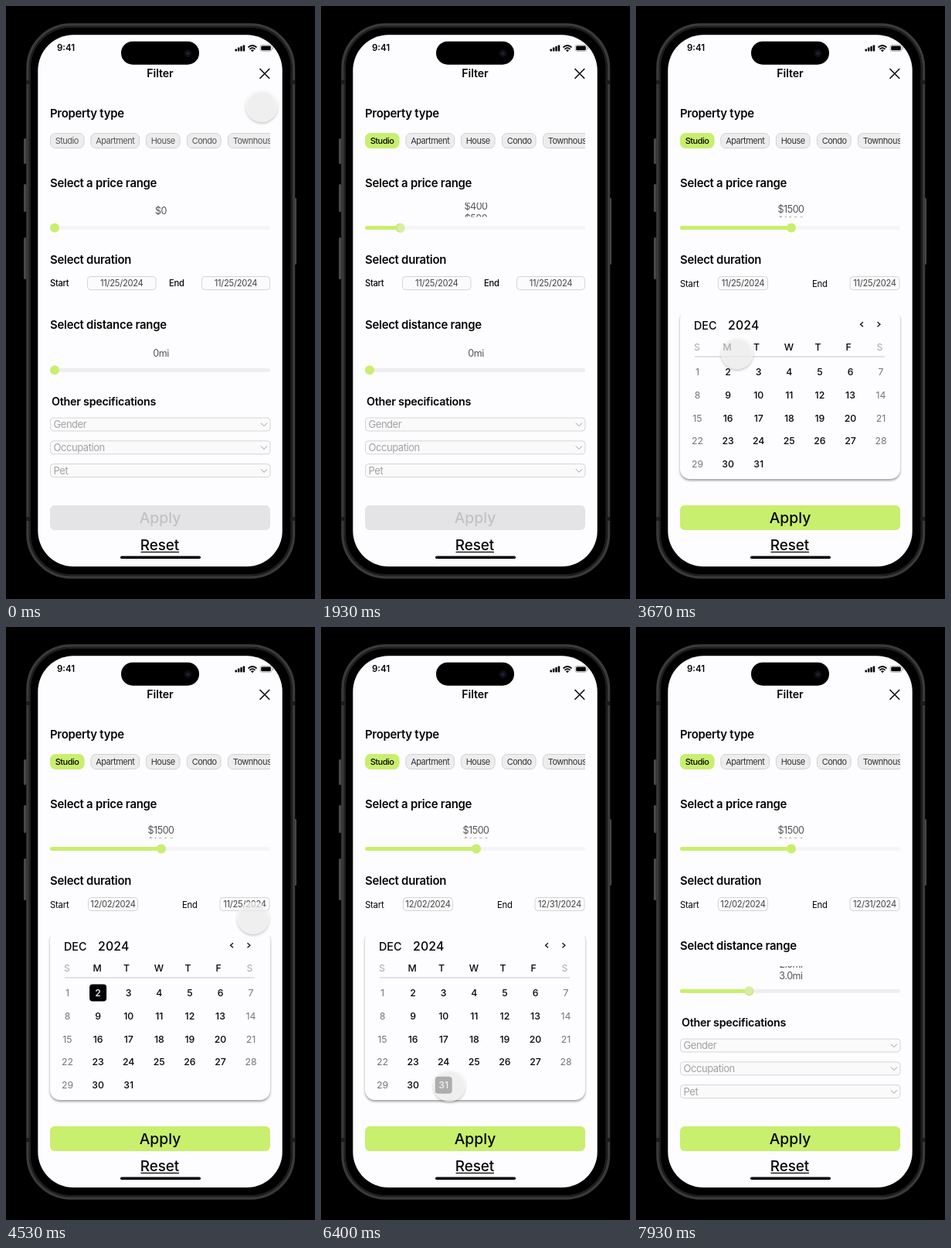
An HTML page that plays this animation: 400 by 766 pixels, repeating every 8 s.

```html
<!DOCTYPE html>
<html lang="en">
<head>
<meta charset="utf-8">
<title>Filter screen</title>
<style>
html, body { margin: 0; width: 100%; height: 100%; overflow: hidden; background: #000; }
svg { display: block; width: 100vw; height: 100vh; font-family: Inter, "Open Sans", sans-serif; }
text { white-space: pre; }
#touch { filter: drop-shadow(0 2.5px 1.6px rgba(0,0,0,.27)); }
</style>
</head>
<body>
<svg id="stage" viewBox="0 0 400 766"></svg>
<script>
const LOOP = 8000;
const GREEN = '#c8ef6e';
const INK = '#050505';
const stage = document.getElementById('stage');

// Markup helpers
const rect = (x, y, w, h, r, fill, more = '') =>
  `<rect x="${x}" y="${y}" width="${w}" height="${h}" rx="${r}" fill="${fill}" ${more}/>`;
const path = (d, color, width, more = '') =>
  `<path d="${d}" fill="none" stroke="${color}" stroke-width="${width}" ${more}/>`;
const circle = (x, y, r, fill, more = '') =>
  `<circle cx="${x}" cy="${y}" r="${r}" fill="${fill}" ${more}/>`;
const label = (s, x, y, size, { weight = 400, fill = INK, anchor = 'start', gap = 0, id = '' } = {}) =>
  `<text x="${x}" y="${y}" font-size="${size}" font-weight="${weight}" fill="${fill}"
    text-anchor="${anchor}" letter-spacing="${gap}" ${id && `id="${id}"`}>${s}</text>`;
const group = (id, body, more = '') => `<g id="${id}" ${more}>${body}</g>`;
const heading = (s, y, x = 57, size = 14.9) => label(s, x, y, size, { weight: 600, gap: -.25 });

function phone() {
  const buttons = [[23, 171, 33], [23, 230, 36], [23, 299, 54], [372.5, 248, 86]]
    .map(([x, y, h]) => rect(x, y, 3.5, h, 1.5, '#48484a')).join('');
  const bands = [[26, 96], [26, 660], [368, 96], [368, 660]]
    .map(([x, y]) => rect(x, y, 6, 5, 0, '#1b1b1c')).join('');
  return buttons +
    rect(28, 24, 344.5, 714, 56, '#000', 'stroke="#3a3a3c" stroke-width="3.5"') +
    rect(31, 27, 338.5, 708, 53, '#000', 'stroke="#202021" stroke-width="2"') + bands +
    rect(41.3, 37.3, 316.4, 686.7, 46, '#fdfcfe') +
    rect(149, 45.7, 101, 30, 15, '#000') +
    circle(235.5, 61.3, 5, '#0d0e13') + circle(235.5, 61.3, 2.3, '#1c2030');
}

function header() {
  const bars = [3, 5, 6.5, 8].map((h, i) => rect(296.5 + i * 3.4, 58.5 - h, 2.5, h, .7, INK)).join('');
  const wifi = path('M313.5 53.5Q319 48.5 324.5 53.5M315.5 55.8Q319 52.6 322.5 55.8', INK, 1.7) +
    `<path d="M317 57.2Q319 55.4 321 57.2L319 59.2Z" fill="${INK}"/>`;
  const battery = rect(329, 50.3, 15, 8.2, 2.4, 'none', 'stroke="#aaa" stroke-width=".8"') +
    rect(330.2, 51.5, 12.6, 5.8, 1.4, INK) + rect(344.9, 53, 1, 3, .5, '#aaa');
  return label('9:41', 66, 58, 11.5, { weight: 600 }) + bars + wifi + battery +
    label('Filter', 199.5, 92, 14.2, { weight: 600, anchor: 'middle', gap: -.1 }) +
    path('M328.5 81L341.2 93.7M341.2 81L328.5 93.7', INK, 1.5);
}

function chips() {
  const items = [['Studio', 57, 44.5], ['Apartment', 109.5, 63.5], ['House', 181, 44.5], ['Condo', 234, 44.5], ['Townhouse', 287, 70]];
  const body = items.map(([name, x, w], i) =>
    rect(x + .4, 164.5, w - .8, 19, 6.5, '#ededee', `stroke="#cfcfd1" stroke-width=".9" ${i ? '' : 'id="studio"'}`) +
    label(name, x + 6.7, 178, 11, { gap: -.5 })).join('');
  return heading('Property type', 144) + group('chips', body, 'clip-path="url(#chipClip)"');
}

function slider(id, y, track) {
  return rect(57, y - 2.5, 285, 5, 2.5, track) +
    rect(57, y - 2.5, 6, 5, 2.5, GREEN, `id="${id}Fill"`) +
    circle(63, y, 6, GREEN, `id="${id}Knob"`);
}

const reel = (id, values, y, step) => group(id + 'Clip',
  group(id + 'Reel', values.map((v, i) =>
    label(v, 200.5, y + i * step, 12.5, { fill: '#555', anchor: 'middle', gap: -.45 })).join('')),
  `clip-path="url(#${id}Window)"`);

const dateBox = (s, x, w, id) =>
  rect(x, 349.5, w, 17, 4, '#fbfafc', 'stroke="#d4d4d6" stroke-width="1"') +
  label(s, x + w / 2, 362, 11.2, { fill: '#444', anchor: 'middle', gap: -.28, id });

function dates() {
  const day = '11/25/2024';
  const bold = { weight: 500, gap: -.3 };
  return heading('Select duration', 333) +
    group('wideDates', label('Start', 57, 361.5, 11.2, bold) + dateBox(day, 105.5, 88.5) +
      label('End', 211, 361.5, 11.2, bold) + dateBox(day, 253.5, 88)) +
    group('slimDates', label('Start', 57, 362.5, 11.3, { gap: -.2 }) + dateBox(day, 106.5, 64, 'startDate') +
      label('End', 228, 362.5, 11.3, { gap: -.2 }) + dateBox(day, 277, 64, 'endDate'));
}

function lower() {
  const selects = ['Gender', 'Occupation', 'Pet'].map((name, i) => {
    const y = 532 + i * 29.8;
    return rect(57.5, y, 284.5, 17, 4, '#fafafb', 'stroke="#d6d6d8" stroke-width="1"') +
      label(name, 61.5, y + 13, 13, { fill: '#a2a2a4', gap: -.45 }) +
      path(`M330 ${y + 6.7}l4 4l4 -4`, '#9a9a9c', 1);
  }).join('');
  const miles = Array.from({ length: 8 }, (_, i) => (i ? (i / 2).toFixed(1) : '0') + 'mi');
  return heading('Select distance range', 417) + reel('mile', miles, 452.5, 15) +
    slider('mile', 470.3, '#eeedef') + heading('Other specifications', 516, 59, 14.3) + selects;
}

const columnX = c => 79.5 + c * 39.6;
const rowY = r => 472.5 + r * 29.8;

function calendar() {
  const mid = (s, x, y, weekend, light, size = 12.3) => label(s, x, y, size,
    { weight: weekend ? 400 : 500, fill: weekend ? light : INK, anchor: 'middle' });
  const names = [79, 118, 156, 198, 235.5, 275, 315.5]
    .map((x, i) => mid('SMTWTFS'[i], x, 445, i % 6 === 0, '#aaa')).join('');
  const days = Array.from({ length: 31 }, (_, i) =>
    mid(i + 1, columnX(i % 7), rowY(Math.floor(i / 7)) + 4.5, i % 7 % 6 === 0, '#777')).join('');
  const picked = (id, day) => {
    const x = columnX((day - 1) % 7), y = rowY(Math.floor((day - 1) / 7));
    return group(id, rect(x - 11, y - 11, 22, 22, 4, '#000') +
      label(day, x, y + 4.5, 12.3, { weight: 500, fill: '#fff', anchor: 'middle' }));
  };
  return `<g clip-path="url(#cardClip)">${rect(57, 392, 285, 219, 13, '#fdfcfe',
      'style="filter:drop-shadow(0 2px 1.6px rgba(0,0,0,.38))"')}</g>` +
    label('DEC', 75, 417.5, 14.3, { weight: 500 }) +
    label('2024', 119, 417.5, 15.8, { weight: 500, gap: .2 }) +
    path('M294 408.3l-3.5 3l3.5 3M312.5 408.3l3.5 3l-3.5 3', INK, 1.2) +
    names + path('M76 453H322', '#c6c6c8', 1) + days + picked('pickStart', 2) + picked('pickEnd', 31);
}

const clip = (id, x, y, w, h) => `<clipPath id="${id}">${rect(x, y, w, h, 0, '#000')}</clipPath>`;
const prices = Array.from({ length: 18 }, (_, i) => '$' + i * 100);

stage.innerHTML = '<defs>' + clip('chipClip', 50, 160, 292, 30) + clip('priceWindow', 160, 254, 80, 18.6) +
  clip('mileWindow', 160, 438, 80, 20) + clip('cardClip', 50, 399, 300, 220) + '</defs>' +
  phone() + header() + chips() +
  heading('Select a price range', 234) + reel('price', prices, 268.5, 15.8) + slider('price', 286.6, '#f5f4f6') +
  dates() + group('lower', lower()) + group('calendar', calendar()) +
  rect(57, 645, 285, 32, 6, GREEN, 'id="applyBox"') +
  label('Apply', 199.5, 668, 19.3, { weight: 500, anchor: 'middle', id: 'applyText' }) +
  label('Reset', 199, 703, 18.9, { weight: 500, anchor: 'middle', gap: -.1 }) + path('M174.5 705.3H224', INK, 1.3) +
  rect(148, 710.5, 104, 3.4, 1.7, '#000') +
  group('touch', circle(0, 0, 21, '#fff', 'fill-opacity=".68"'));

const el = Object.fromEntries([...stage.querySelectorAll('[id]')].map(node => [node.id, node]));
const chipTexts = [...el.chips.querySelectorAll('text')];
const set = (id, attrs) => Object.entries(attrs).forEach(([k, v]) => el[id].setAttribute(k, v));

// Touch positions: time, x, y. Repeated places are rests.
const route = [
  [0, 331, 129], [70, 331, 129], [580, 79, 175], [790, 79, 175], [1070, 102, 262],
  [1450, 65, 287], [1730, 65, 287], [2300, 201, 287], [2420, 201, 287], [2730, 157, 378],
  [2870, 152, 366], [3370, 152, 366], [3670, 131, 448], [3870, 121, 473], [4130, 121, 473],
  [4530, 320, 376], [4700, 312, 362], [5150, 312, 362], [5850, 166, 592], [6480, 166, 592],
  [6780, 205, 388], [6920, 205, 388], [7300, 65, 470], [7480, 65, 470], [7930, 146, 470], [8000, 146, 470]
];

const TIMES = { studio: 680, open: 2960, start: 3970, end: 4860, last: 6130, close: 6860 };
const smooth = (t, a, b) => {
  const p = Math.min(1, Math.max(0, (t - a) / (b - a)));
  return p * p * (3 - 2 * p);
};

// Smooth path through the route, still at each rest
function along(t, axis) {
  let i = route.findIndex((p, n) => n < route.length - 1 && t < route[n + 1][0]);
  if (i < 0) i = route.length - 2;
  const slope = n => {
    const a = route[n - 1], b = route[n], c = route[n + 1];
    if (!a || !c) return 0;
    const before = (b[axis] - a[axis]) / (b[0] - a[0]);
    const after = (c[axis] - b[axis]) / (c[0] - b[0]);
    return before * after > 0 ? 2 * before * after / (before + after) : 0;
  };
  const a = route[i], b = route[i + 1], span = b[0] - a[0];
  const p = (t - a[0]) / span, q = 1 - p;
  return a[axis] * q * q * (1 + 2 * p) + b[axis] * p * p * (3 - 2 * p) +
    span * p * q * (q * slope(i) - p * slope(i + 1));
}

function moveSlider(id, p, travel, roll) {
  const x = 63 + travel * p;
  set(id + 'Knob', { cx: x });
  set(id + 'Fill', { width: x - 57 });
  set(id + 'Reel', { transform: `translate(0 ${-roll * p})` });
}

function draw(t) {
  const opened = smooth(t, TIMES.open, TIMES.open + 150);
  const card = opened - smooth(t, TIMES.close, TIMES.close + 150);
  const chosen = t >= TIMES.studio;

  set('studio', { fill: chosen ? GREEN : '#ededee', stroke: chosen ? GREEN : '#cfcfd1' });
  chipTexts.forEach((node, i) => node.setAttribute('fill', !chosen ? '#555' : i ? '#333' : INK));
  chipTexts[0].setAttribute('font-weight', chosen ? 500 : 400);

  moveSlider('price', smooth(t, 1730, 2300), 138, 239);
  moveSlider('mile', smooth(t, 7480, 7930), 83.5, 88);

  set('wideDates', { opacity: 1 - opened });
  set('slimDates', { opacity: opened });
  el.startDate.textContent = t < TIMES.start ? '11/25/2024' : '12/02/2024';
  el.endDate.textContent = t < TIMES.last ? '11/25/2024' : '12/31/2024';
  set('lower', { opacity: 1 - card });
  set('calendar', { opacity: card });
  set('pickStart', { opacity: t >= TIMES.start && t < TIMES.end ? 1 : 0 });
  set('pickEnd', { opacity: t >= TIMES.last ? 1 : 0 });
  set('applyBox', { fill: opened > .5 ? GREEN : '#e4e3e5' });
  set('applyText', { fill: opened > .5 ? INK : '#c2c1c3' });

  const press = smooth(t, 1730, 1830) - smooth(t, 2300, 2400) + smooth(t, 7420, 7540);
  set('touch', {
    transform: `translate(${along(t, 1)} ${along(t, 2)}) scale(${1 - .74 * press})`,
    opacity: 1 - .4 * press
  });
}

const began = performance.now();
function tick() {
  draw((performance.now() - began) % LOOP);
  requestAnimationFrame(tick);
}
tick();
</script>
</body>
</html>
```
